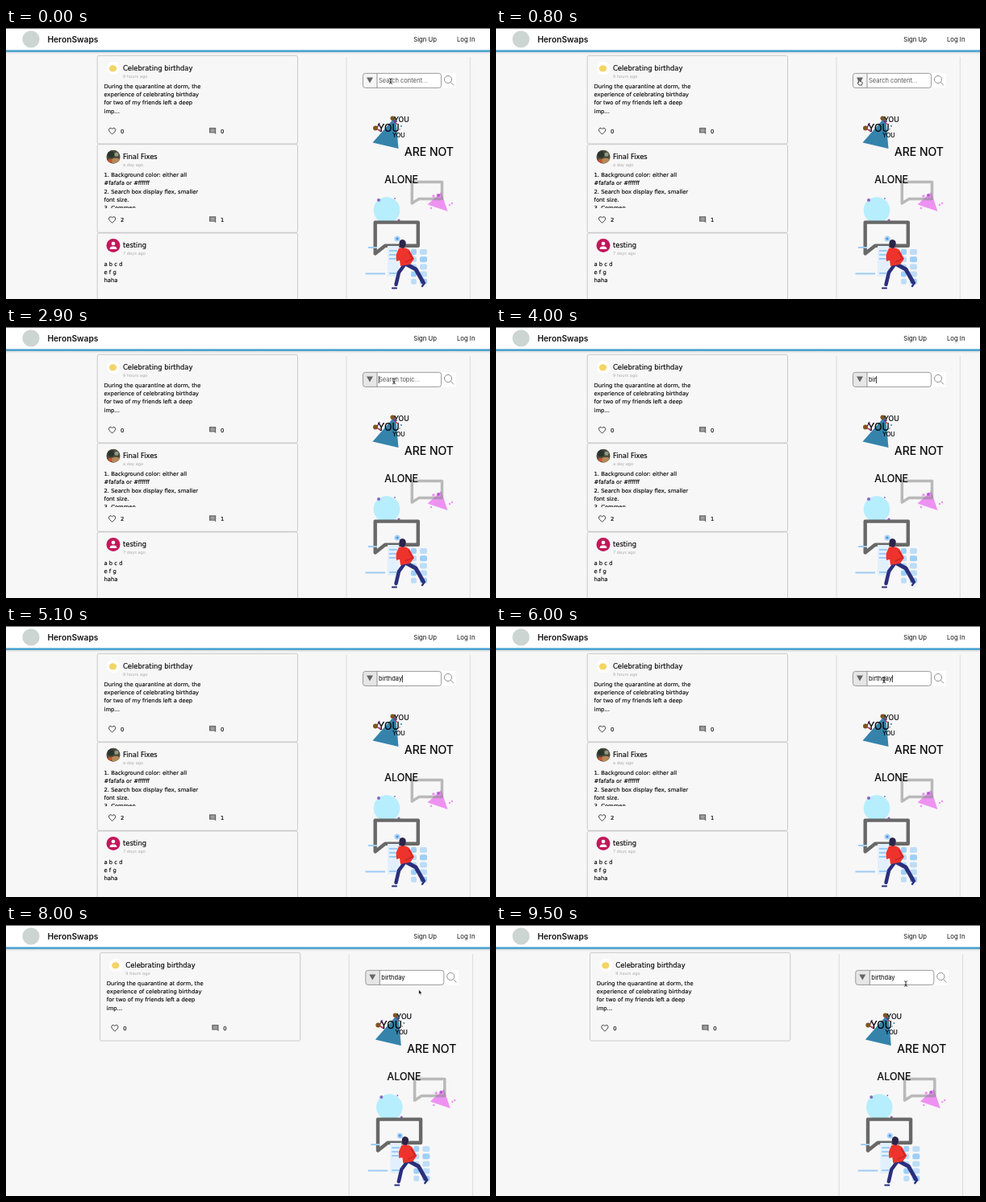
These frames come from a looping animation (600x337 px, 9600 ms). An HTML page:

```html
<!DOCTYPE html>
<html lang="en">
<head>
<meta charset="utf-8">
<title>Post search</title>
<style>
  html, body { margin: 0; width: 100%; height: 100%; overflow: hidden; background: #f7f7f7; }
  svg { display: block; width: 600px; height: 337px; }
  text { white-space: pre; }
  .ui { font-family: Inter, sans-serif; fill: #111; }
  .words { fill: #000; stroke: #000; stroke-width: .2; }
  .post { font-family: "DejaVu Sans", sans-serif; font-size: 6.8px; fill: #000; }
  .post text:not(.age) { stroke: #000; stroke-width: .14; }
  .post .title { font-size: 8.4px; }
  .post .age { font-size: 5.1px; fill: #aaa; }
</style>
</head>
<body>
<svg viewBox="0 0 600 337">
  <defs>
    <clipPath id="face"><circle cx="133" cy="50" r="8.5"/></clipPath>
    <clipPath id="body"><rect x="113" y="60" width="248" height="53.8"/></clipPath>
    <linearGradient id="shade" x2="0" y2="1">
      <stop stop-color="#bbb"/><stop offset="1" stop-color="#f7f7f7"/>
    </linearGradient>
  </defs>
  <rect width="600" height="337" fill="#f7f7f7"/>

  <g id="page">
    <g id="posts"></g>

    <path d="M422 36V337M575.3 36V337" stroke="#dcdcdc"/>
    <rect x="540" y="56" width="18" height="18.5" fill="#fff"/>
    <g fill="none" stroke="#777" stroke-width=".8">
      <circle cx="548" cy="64" r="4.6"/><path d="M551.4 67.4L555 71.4"/>
    </g>
    <rect x="442.5" y="56.4" width="97" height="18" rx="3" fill="#fff"/>
    <path id="menu" d="M460 56.4H445.5Q442.5 56.4 442.5 59.4V71.4Q442.5 74.4 445.5 74.4H460Z"/>
    <path d="M460 56.4V74.4" stroke="#777" stroke-width=".8"/>
    <rect x="442.5" y="56.4" width="97" height="18" rx="3" fill="none" stroke="#858585" stroke-width=".8"/>
    <path d="M447 61.6H455L451 68.6Z" fill="#666"/>
    <text id="query" class="ui" x="462" y="68.2" font-size="7.5"></text>
    <path id="caret" d="M0 61V70" stroke="#111" stroke-width=".8"/>

    <!-- party -->
    <path d="M483 110L454.5 142.5L486.5 150Z" fill="#3583ab"/>
    <path d="M458 124L465 129M479 112L483 118M460 124L463 118" stroke="#7b2d8e" stroke-width="1.5"/>
    <g fill="#80551f"><circle cx="458" cy="124.5" r="3"/><circle cx="479.3" cy="112.3" r="2.8"/></g>
    <g fill="#d33b4d"><circle cx="463" cy="127" r="1"/><circle cx="484" cy="119" r="1"/></g>
    <g fill="#3583ab"><circle cx="490" cy="122" r="1"/><circle cx="488" cy="126" r=".8"/></g>

    <!-- bubbles -->
    <path d="M539.5 204L522.5 219.5L547.5 228Z" fill="#ee92f2"/>
    <path d="M503.3 191.5H540.5V212.5H512L503.3 218Z" fill="none" stroke="#888" stroke-opacity=".55" stroke-width="3.5" stroke-linejoin="round"/>
    <g fill="#ee92f2">
      <circle cx="530" cy="209" r="1.8"/><circle cx="553" cy="218" r="1.2"/>
      <circle cx="550" cy="220" r="1.2"/><circle cx="527" cy="224" r="1.3"/>
    </g>
    <circle cx="536" cy="208" r="2" fill="#b35fd0"/>
    <circle cx="472" cy="226.5" r="16.3" fill="#b6eefd"/>
    <g fill="#8a63c8">
      <circle cx="462" cy="214" r="2"/><circle cx="487" cy="239" r="1.6"/><circle cx="482" cy="212" r=".9"/>
    </g>
    <path d="M457.7 241.6H510.8V270.8H470L457.7 280.5Z" fill="none" stroke="#686868" stroke-width="4.4" stroke-linejoin="round"/>

    <g class="ui words">
      <text x="481" y="117" font-size="8.7">YOU</text>
      <text x="461" y="129.3" font-size="12.4">YOU</text>
      <text x="479.3" y="136.4" font-size="7.1">YOU</text>
      <text x="494" y="159.4" font-size="14">ARE NOT</text>
      <text x="469.3" y="193" font-size="12.5">ALONE</text>
    </g>

    <!-- walker -->
    <rect x="473" y="271" width="14" height="38" fill="#e2f0fd"/>
    <circle cx="485" cy="262" r="3.6" fill="#a9d3f8"/>
    <circle cx="485" cy="262" r="1.5" fill="#4b8fe0"/>
    <path d="M449 273H460M445.5 305.5H470M475 277H485M475 282H483M475 287H485M475 305H484" stroke="#9dccf6" stroke-width="1.8"/>
    <g id="tiles" fill="#9ecff7"></g>
    <g fill="none" stroke="#2b2f7c" stroke-linecap="round" stroke-linejoin="round">
      <path d="M495 293L487 304L483.5 319" stroke-width="4.5"/>
      <path d="M495 293L508 300L517 316" stroke-width="5"/>
      <path d="M479 323.5H484M516 321L519 317" stroke-width="2.2"/>
    </g>
    <path d="M487 274Q494 271 500 276L506 287L501 294L489 296L488 289L484 290L483.5 282Z" fill="#ee332c"/>
    <path d="M499 278L504 287L495 291" fill="none" stroke="#c32026" stroke-width="1.2"/>
    <path d="M487.5 269Q487 263 491.5 263Q497 264 495.5 270L493 274L488.5 273Z" fill="#2b254c"/>
  </g>

  <!-- header -->
  <rect y="30" width="600" height="3" fill="url(#shade)" opacity=".45"/>
  <rect width="600" height="28" fill="#fff"/>
  <rect width="600" height="1" fill="#666"/>
  <rect y="27.4" width="600" height="2.5" fill="#449fcd"/>
  <circle cx="31" cy="14" r="10.6" fill="#ccd5d2"/>
  <g class="ui" font-size="7.7">
    <text x="51.5" y="17.7" font-size="10.2" font-weight="600">HeronSwaps</text>
    <text x="505.3" y="16.8">Sign Up</text>
    <text x="559" y="16.8">Log In</text>
  </g>

  <g id="cursor" stroke-linejoin="round" stroke-linecap="round">
    <path data-kind="beam" d="M-1.7 -3.3Q0 -3.3 0 -2V2Q0 3.3 -1.7 3.3M1.7 -3.3Q0 -3.3 0 -2M0 2Q0 3.3 1.7 3.3M-1 1H1" fill="none" stroke="#222" stroke-width=".8"/>
    <path data-kind="hand" d="M-1.6 -3.2Q-.8 -4 -.2 -3V-.8L2.6 0Q3.4 .4 3 2L2.4 4H-.9L-3 1.2Q-2.8 .2 -1.6 1Z" fill="#fff" stroke="#222" stroke-width=".8"/>
    <path data-kind="arrow" d="M-1.2 -3V2.6L.1 1.5L1 3.6L1.9 3.2L1 1.2H2.7Z" fill="#111" stroke="#fff" stroke-width=".4"/>
  </g>
</svg>

<script>
const LOOP = 9600, STEP = 100;
const TYPE_START = 3400, TYPE_END = 5000, FOCUS = 2600, RESULTS = 7300;
const WORD = "birthday";
const $ = id => document.getElementById(id);

const chick = `<rect x="125" y="42" width="16" height="16" rx="7" fill="#fff"/>
  <ellipse cx="132.5" cy="50.3" rx="4.6" ry="4" fill="#f3d466"/>`;
const photo = `<g clip-path="url(#face)"><rect x="124" y="41" width="18" height="18" fill="#4b4a3c"/>
  <circle cx="130" cy="47" r="4" fill="#28352d"/><ellipse cx="136" cy="55" rx="6" ry="3.5" fill="#b78858"/>
  <circle cx="137" cy="47" r="2.5" fill="#8e9a82"/><circle cx="129" cy="55" r="2.5" fill="#c7542f"/></g>`;
const person = `<circle cx="133" cy="50" r="8.5" fill="#c2185b"/><circle cx="133" cy="47.4" r="2.3" fill="#fff"/>
  <path d="M128.6 54.4Q128.6 51 133 51Q137.4 51 137.4 54.4Z" fill="#fff"/>`;

const posts = [
  { avatar: chick, title: "Celebrating birthday", age: "9 hours ago", replies: 0, likes: 0,
    lines: ["During the quarantine at dorm, the", "experience of celebrating birthday", "for two of my friends left a deep", "imp..."] },
  { avatar: photo, title: "Final Fixes", age: "a day ago", replies: 1, likes: 2,
    lines: ["1. Background color: either all", "#fafafa or #ffffff", "2. Search box display flex, smaller", "font size.", "3. Commen"] },
  { avatar: person, title: "testing", age: "7 days ago", replies: 0, likes: 0,
    lines: ["a b c d", "e f g", "haha"] }
];

const card = ({ avatar, title, age, lines, likes, replies }, i) => `
  <g class="post" transform="translate(0 ${i * 110.3})">
    <rect x="113.2" y="34.4" width="248.3" height="109.6" rx="2" fill="#f7f7f7" stroke="#c4c4c4" stroke-width=".9"/>
    ${avatar}
    <text class="title" x="145" y="52.6">${title}</text>
    <text class="age" x="145" y="61.6">${age}</text>
    <g clip-path="url(#body)">${lines.map((line, n) =>
      `<text x="121.5" y="${75 + n * 10.2}">${line}</text>`).join("")}</g>
    <path d="M131.6 132.2L128.3 128.9Q126.4 126.6 128.3 124.8Q130.3 123.6 131.6 125.6Q132.9 123.6 134.9 124.8Q136.8 126.6 134.9 128.9Z" fill="none" stroke="#333" stroke-width=".9"/>
    <path d="M252 124H260.2V132.2L258.4 130.5H252Z" fill="#666"/>
    <path d="M253.4 125.8H258.8M253.4 127.3H258.8M253.4 128.8H258.8" stroke="#eee" stroke-width=".6"/>
    <text x="142" y="130.6">${likes}</text>
    <text x="266" y="130.6">${replies}</text>
  </g>`;
$("posts").innerHTML = posts.map(card).join("");

$("tiles").innerHTML = Array.from({ length: 10 }, (_, i) => {
  const x = 502 + (i % 2) * 11, y = 275 + (i >> 1) * 9.2;
  return `<rect x="${x}" y="${y}" width="${i % 2 ? 9 : 7}" height="7" rx="2" opacity="${i % 3 ? .65 : 1}"/>`;
}).join("");

// Pointer stops: time, x, y
const path = [
  [0, 477, 66], [300, 477, 66], [700, 451, 67], [1000, 451, 67], [1600, 480, 69], [2900, 481, 67.5],
  [6000, 481, 67.5], [6600, 546, 71.5], [7300, 546, 71.5], [8000, 513, 83.5], [8600, 513, 83.5],
  [9300, 508, 73], [9600, 508, 73]
];

function pointerAt(t) {
  const i = path.findIndex((stop, n) => n && t < stop[0]);
  const [t0, x0, y0] = path[i - 1], [t1, x1, y1] = path[i];
  const p = (t - t0) / (t1 - t0), k = p * p * (3 - 2 * p);
  return [x0 + (x1 - x0) * k, y0 + (y1 - y0) * k];
}

function kindAt(x, y) {
  if (y < 56 || y > 75 || x < 442 || x > 561) return "arrow";
  return x > 460 && x < 540 ? "beam" : "hand";
}

const show = (el, on) => el.setAttribute("visibility", on ? "visible" : "hidden");

function draw(t) {
  const found = t >= RESULTS;
  $("page").setAttribute("transform", `translate(${found ? 3.3 : 0} 0)`);
  [...$("posts").children].forEach((el, i) => show(el, !found || i === 0));
  $("menu").setAttribute("fill", t < 900 ? "#f5f5f5" : "#e6e6e6");

  const progress = (t - TYPE_START) / (TYPE_END - TYPE_START);
  const typed = WORD.slice(0, Math.max(0, Math.ceil(progress * WORD.length)));
  const query = $("query");
  query.textContent = typed || (t < 900 ? "Search content..." : "Search topic...");
  query.style.fill = typed ? "#000" : "#555";

  const typing = t >= TYPE_START && t < TYPE_END;
  const blink = (t - (t < TYPE_START ? FOCUS : TYPE_END)) % 1000 < 500;
  show($("caret"), t >= FOCUS && t < 6900 && (typing || blink));
  const caretX = 462.3 + (typed ? query.getComputedTextLength() : 0);
  $("caret").setAttribute("transform", `translate(${caretX} 0)`);

  const [x, y] = pointerAt(t), kind = kindAt(x, y);
  const hidden = t >= TYPE_START && t < 6000;
  $("cursor").setAttribute("transform", `translate(${x} ${y})`);
  for (const el of $("cursor").children) show(el, !hidden && el.dataset.kind === kind);
}

const start = performance.now();
function tick() {
  const t = (performance.now() - start) % LOOP;
  draw(Math.floor(t / STEP) * STEP);
  requestAnimationFrame(tick);
}
tick();
</script>
</body>
</html>
```
